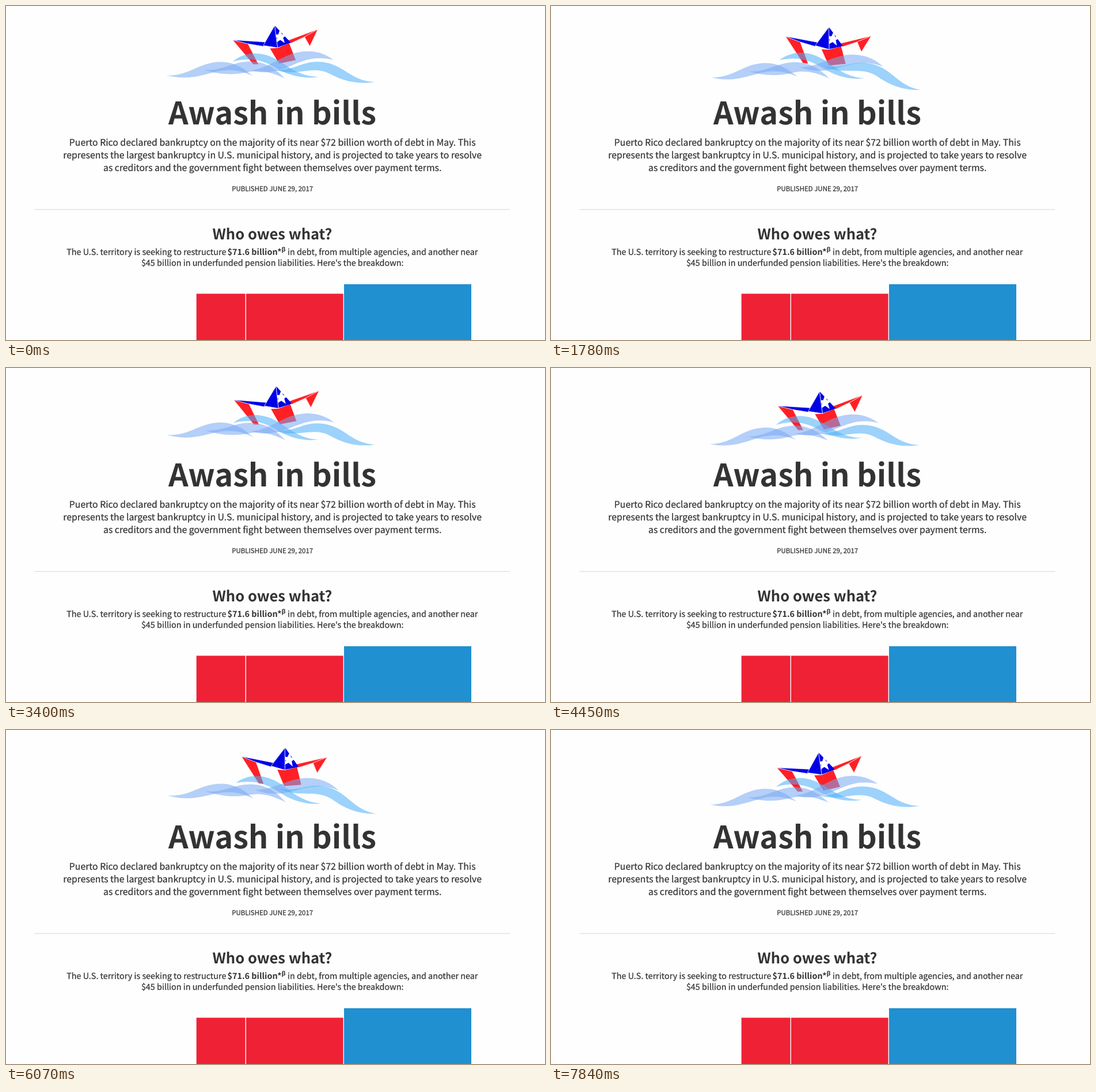
Recreate the animation shown at these times as an HTML page. Size 936 by 581 pixels, loop 7.99 s.

```html
<!DOCTYPE html>
<html lang="en">
<head>
<meta charset="utf-8">
<title>Awash in bills</title>
<style>
  html, body { margin: 0; width: 100%; height: 100%; overflow: hidden; background: #fefefe; }
  svg { display: block; width: 936px; height: 581px; }
  text {
    font-family: "Noto Sans CJK JP", "Noto Sans CJK SC", "Noto Sans CJK", "Open Sans", sans-serif;
    fill: #333;
    text-rendering: geometricPrecision;
  }
  .center { text-anchor: middle; }
  .bold { font-weight: 700; }
  .intro { font-size: 15.82px; }
  .body { font-size: 14.39px; }
  .firm { stroke: #333; stroke-width: .25; }
  .red { fill: #ff2025; }
  .blue { fill: #0000e6; }
  .seam { stroke: #fff; stroke-width: .6; }
  .violet { fill: #79aaf5; fill-opacity: .55; }
  .sky { fill: #4db0fa; fill-opacity: .55; }
</style>
</head>
<body>
<svg viewBox="0 0 936 581">
  <g id="boat">
    <path class="red seam" d="M408.5 46 434 56 447.5 94 438.5 93Z"/>
    <path class="blue seam" d="M408.5 46 464 57 460 64 434 56Z"/>
    <path class="red" d="M471 69 484 70 505 64.5 512.5 95 483 97.5Z"/>
    <path class="red seam" d="M503 59.5 557.5 47 533 57 508 65Z"/>
    <path class="red seam" d="M557.5 47 533 57 540 74.5Z"/>
    <path class="blue" d="M484.5 31 508 64 484.5 69Z"/>
    <path id="star" fill="#fff"/>
    <path class="blue seam" d="M484 31 460 62.5 484 69.5Z"/>
  </g>
  <g id="left" class="violet">
    <path d="M278 122C318 124 334 98 373 98C398 98 415 111 428 122C408 113 391 110 370 114C341 120 318 132 278 122Z"/>
    <path d="M343 112C374 115 393 97 424 97C453 97 471 113 484 126C460 115 442 111 422 115C396 121 373 121 343 112Z"/>
  </g>
  <path id="middle" class="sky" d="M393 97C407 85 424 81 440 83C480 88 494 122 542 123C520 127 493 122 471 109C446 94 423 89 393 97Z"/>
  <path id="crest" class="violet" d="M425 112C462 108 483 79 524 79C544 79 558 86 569 94C541 87 522 93 502 101C476 112 455 120 425 112Z"/>
  <path id="right" class="sky" d="M467 111C499 113 513 97 540 97C586 97 594 130 640 132.5C603 138 579 127 560 117C530 103 503 124 467 111Z"/>

  <text class="center bold" x="462.5" y="205.5" font-size="54">Awash in bills</text>
  <g class="center intro firm">
    <text x="462.7" y="243">Puerto Rico declared bankruptcy on the majority of its near $72 billion worth of debt in May. This</text>
    <text x="462.7" y="265">represents the largest bankruptcy in U.S. municipal history, and is projected to take years to resolve</text>
    <text x="462.7" y="287">as creditors and the government fight between themselves over payment terms.</text>
  </g>
  <text class="center firm" x="462.7" y="322" font-size="11.48">PUBLISHED JUNE 29, 2017</text>
  <path d="M50 354H875" stroke="#aaa" stroke-dasharray="1 1"/>

  <text class="center bold" x="462.5" y="406" font-size="25.5">Who owes what?</text>
  <g class="body">
    <text class="firm" x="105.2" y="433">The U.S. territory is seeking to restructure</text>
    <text class="bold" x="384.5" y="433">$71.6 billion*</text>
    <text class="bold" x="478.5" y="427" style="font:700 10.5px 'Noto Sans',sans-serif">β</text>
    <text class="firm" x="489" y="433">in debt, from multiple agencies, and another near</text>
    <text class="center firm" x="462.7" y="452">$45 billion in underfunded pension liabilities. Here's the breakdown:</text>
  </g>

  <path fill="#ef2135" d="M330.7 500.5H415.6V581H330.7ZM417 500.5H585.6V581H417Z"/>
  <path fill="#2090d0" d="M587 484H808V581H587Z"/>
</svg>
<script>
const LOOP = 7990, STEP = LOOP / 54;
const TILT_PERIOD = 3550, BOB_PERIOD = 3650;
const part = id => document.getElementById(id);
const wave = (time, peak, period) => Math.cos(2 * Math.PI * (time - peak) / period);

function place(id, dy, angle, x, y) {
  part(id).setAttribute('transform', `translate(0 ${dy}) rotate(${angle} ${x} ${y})`);
}

function starPath(x, y, radius, turn) {
  const points = Array.from({ length: 10 }, (_, i) => {
    const angle = turn + i * Math.PI / 5, r = i % 2 ? radius * .4 : radius;
    return `${x + r * Math.sin(angle)} ${y - r * Math.cos(angle)}`;
  });
  return `M${points.join('L')}Z`;
}

function draw(time) {
  const tilt = -3.7 + 4.9 * wave(time, 2225, TILT_PERIOD);
  const bob = 5.7 * wave(time, 1080, BOB_PERIOD);
  const sway = -2.9 * wave(time, 990, BOB_PERIOD);
  const swing = tilt + 7;

  place('boat', bob + 3.9, tilt - .4, 483, 165);
  place('left', 0, sway, 490, 177);
  place('middle', 0, .35 * swing + .5 * sway, 470, 190);
  place('crest', .3 * bob + .4, swing, 485, 165);
  place('right', .3 * bob + .4, swing, 535, 160);
}

// Poses change in even steps; the small lead absorbs timer rounding.
function tick() {
  const time = performance.now() % LOOP;
  draw(Math.floor(time / STEP + .08) * STEP);
  requestAnimationFrame(tick);
}

part('star').setAttribute('d', starPath(491, 51.5, 13.5, .12));
tick();
</script>
</body>
</html>
```
